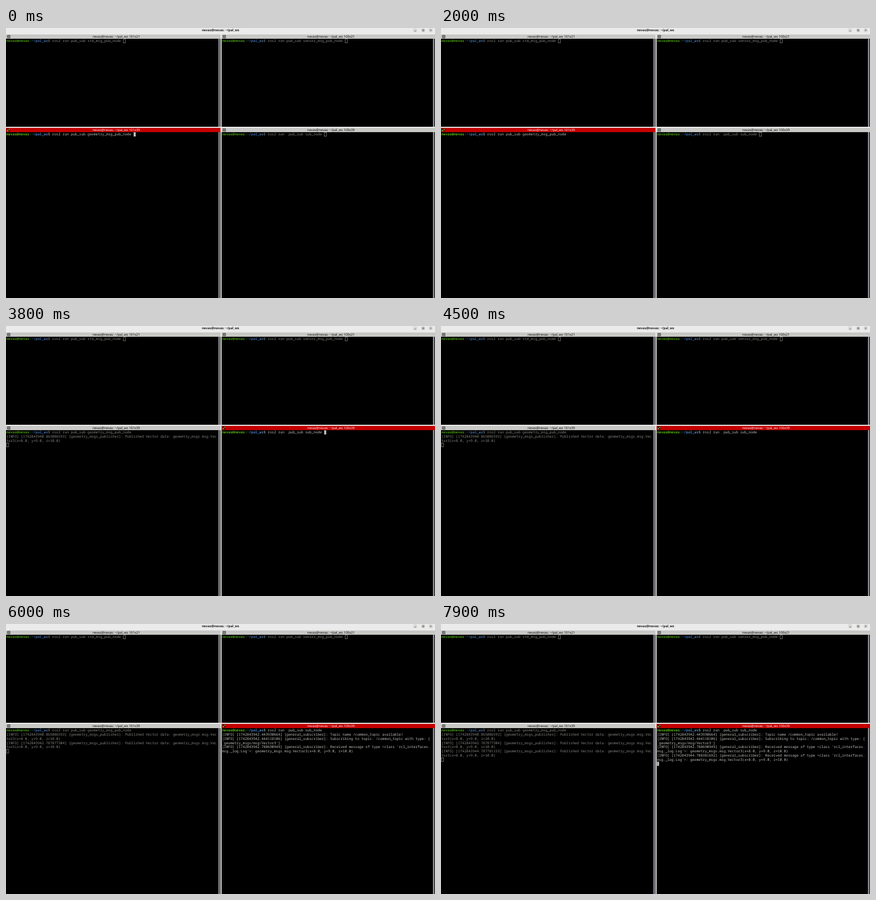
Animation, 800 px wide and 503 px high, one loop 8 s. Source, as an HTML page:

```html
<!DOCTYPE html>
<html lang="en">
<head>
<meta charset="utf-8">
<title>Terminal panes</title>
<style>
html, body { margin: 0; width: 100%; height: 100%; overflow: hidden; background: #000; }
svg { display: block; width: 800px; height: 503px; }
text { white-space: pre; text-rendering: geometricPrecision; }
.bar { font: 6.12px "Open Sans", "Noto Sans", sans-serif; text-anchor: middle; }
.head { font-weight: 700; font-size: 6.05px; }
.term { font: 6.483px "Noto Sans Mono", "DejaVu Sans Mono", monospace; }
.term .user { font-weight: 700; }
</style>
</head>
<body>
<svg id="stage" viewBox="0 0 800 503" xmlns="http://www.w3.org/2000/svg"></svg>
<script>
const LOOP = 8000, BLINK = 600;
const COL = 3.89, ROW = 7.78;
const USER = "nevas@nevas", PATH = "~/pal_ws";
const LIVE = { user: "#5cba16", path: "#4b7fbd", text: "#c4c4be" };
const DIM = { user: "#469a0e", path: "#3b689e", text: "#888884" };
const BAR = { live: "#c40000", idle: "#c8c8c6" };

// Moments of the session, in ms
const RUN_PUB = 2100, FOCUS_SUB = 2400, RUN_SUB = 5000, SUB_READY = 5400;
const SENT = [3800, 5700, 7700];

const stage = document.getElementById("stage");

function add(parent, tag, attrs, content) {
  const node = document.createElementNS("http://www.w3.org/2000/svg", tag);
  for (const key in attrs) node.setAttribute(key, attrs[key]);
  if (content !== undefined) node.textContent = content;
  parent.appendChild(node);
  return node;
}

function box(parent, x, y, width, height, fill) {
  return add(parent, "rect", { x, y, width, height, fill });
}

const info = (stamp, node, message) => `[INFO] [${stamp}] [${node}]: ${message}`;
const vector = "geometry_msgs.msg.Vector3(x=8.0, y=9.0, z=10.0)";
const published = stamp =>
  info(stamp, "geometry_msgs_publisher", "Published Vector data: " + vector);
const received = stamp =>
  info(stamp, "general_subscriber",
    "Received message of type <class 'rcl_interfaces.msg._log.Log'>: " + vector);

const panes = [
  { x: 0, y: 12, w: 400, h: 172, cols: 101, size: "101x21",
    command: "ros2 run pub_sub std_msg_pub_node ", log: [] },
  { x: 402, y: 12, w: 398, h: 172, cols: 100, size: "100x21",
    command: "ros2 run pub_sub sensor_msg_pub_node ", log: [] },
  { x: 0, y: 186, w: 400, h: 317, cols: 101, size: "101x39",
    command: "ros2 run pub_sub geometry_msg_pub_node ", enter: RUN_PUB,
    focus: [0, FOCUS_SUB], blink: [[0, -100], [RUN_PUB, RUN_PUB]],
    log: [
      [SENT[0], published("1742843940.865086593")],
      [SENT[1], published("1742843942.787877304")],
      [SENT[2], published("1742843944.787781153")]
    ] },
  { x: 402, y: 186, w: 398, h: 317, cols: 100, size: "100x39",
    command: "ros2 run  pub_sub sub_node ", enter: RUN_SUB,
    focus: [FOCUS_SUB, LOOP], blink: [[FOCUS_SUB, FOCUS_SUB], [RUN_SUB, RUN_SUB]],
    log: [
      [SUB_READY, info("1742843942.443930664", "general_subscriber",
        "Topic name /common_topic available!")],
      [SUB_READY, info("1742843942.444118106", "general_subscriber",
        "Subscribing to topic: /common_topic with type: ['geometry_msgs/msg/Vector3']")],
      [SENT[1], received("1742843942.788690949")],
      [SENT[2], received("1742843944.788381692")]
    ] }
];

function drawHeader() {
  box(stage, 0, 0, 800, 503, "#ebebeb");
  for (const cx of [763, 778, 792])
    add(stage, "circle", { cx, cy: 4.2, r: 4, fill: "#d8d8d6" });
  add(stage, "path", {
    d: "M761.5 5.6h3M776.7 3h2.6v2.6h-2.6zM790.6 2.8l2.8 2.8m0-2.8l-2.8 2.8",
    fill: "none", stroke: "#3c3c3c", "stroke-width": 0.7
  });
  add(stage, "text", { class: "bar head", x: 400, y: 6.2, fill: "#1c1c1c" },
    `${USER}: ${PATH}`);
}

function buildPane(pane) {
  const { x, y, w, h } = pane;
  box(stage, x, y + 8, w, h - 8, "#000");
  pane.bar = box(stage, x, y, w, 8);
  pane.title = add(stage, "text",
    { class: "bar", x: x ? 606 : 205.5, y: y + 6.1 }, `${USER}: ${PATH} ${pane.size}`);
  pane.idleIcon = add(stage, "path", {
    d: `M${x + 2.5} ${y + 1.5}h5v5h-5zM${x + 5} ${y + 1.5}v5M${x + 2.5} ${y + 4}h5`,
    fill: "none", stroke: "#2c2c2c", "stroke-width": 0.8
  });
  pane.liveIcon = add(stage, "g", {});
  box(pane.liveIcon, x + 1.5, y + 1, 6, 6, "#5a1208");
  box(pane.liveIcon, x + 2, y + 4, 2.2, 2.2, "#74bd42");
  box(pane.liveIcon, x + 5, y + 1.7, 1.8, 1.8, "#74bd42");
  box(stage, x + w - 4, y + 8, 3, h - 8, "#84848c");
  pane.body = add(stage, "g", { class: "term" });
}

function wrap(line, cols) {
  const rows = [];
  for (let i = 0; i < line.length; i += cols) rows.push(line.slice(i, i + cols));
  return rows;
}

function cursorOn(pane, t) {
  const [, start] = pane.blink.filter(([from]) => from <= t).pop();
  return Math.floor((t - start) / BLINK) % 2 === 0;
}

function drawPane(pane, t) {
  const live = !!pane.focus && t >= pane.focus[0] && t < pane.focus[1];
  const ran = t >= pane.enter;
  const shown = pane.log.filter(([at]) => at <= t);
  const lit = live && cursorOn(pane, t);
  const key = [live, ran, shown.length, lit].join();
  if (key === pane.key) return;
  pane.key = key;

  const ink = live ? LIVE : DIM;
  pane.bar.setAttribute("fill", live ? BAR.live : BAR.idle);
  pane.title.setAttribute("fill", live ? "#fff" : "#000");
  pane.idleIcon.setAttribute("opacity", live ? 0 : 1);
  pane.liveIcon.setAttribute("opacity", live ? 1 : 0);

  const left = pane.x + 0.7, top = pane.y + 8.3;
  const rows = shown.flatMap(([, line]) => wrap(line, pane.cols));
  pane.body.replaceChildren();

  const prompt = add(pane.body, "text", { x: left, y: top + 6, fill: ink.text });
  add(prompt, "tspan", { class: "user", fill: ink.user }, USER);
  add(prompt, "tspan", {}, ":");
  add(prompt, "tspan", { class: "user", fill: ink.path }, PATH);
  add(prompt, "tspan", {}, "$ " + pane.command);
  rows.forEach((row, i) => add(pane.body, "text",
    { x: left, y: top + 6 + (i + 1) * ROW, fill: ink.text }, row));

  const col = ran ? 0 : USER.length + PATH.length + 3 + pane.command.length;
  const cx = left + col * COL;
  const cy = top + (ran ? rows.length + 1 : 0) * ROW;
  if (lit) {
    box(pane.body, cx, cy, COL, ROW, "#c0c0bc");
  } else if (!live) {
    add(pane.body, "rect", {
      x: cx + 0.3, y: cy + 0.4, width: COL, height: ROW - 0.8,
      fill: "none", stroke: "#888884", "stroke-width": 0.8
    });
  }
}

function tick() {
  const t = performance.now() % LOOP;
  panes.forEach(pane => drawPane(pane, t));
  requestAnimationFrame(tick);
}

drawHeader();
panes.forEach(buildPane);
tick();
</script>
</body>
</html>
```
